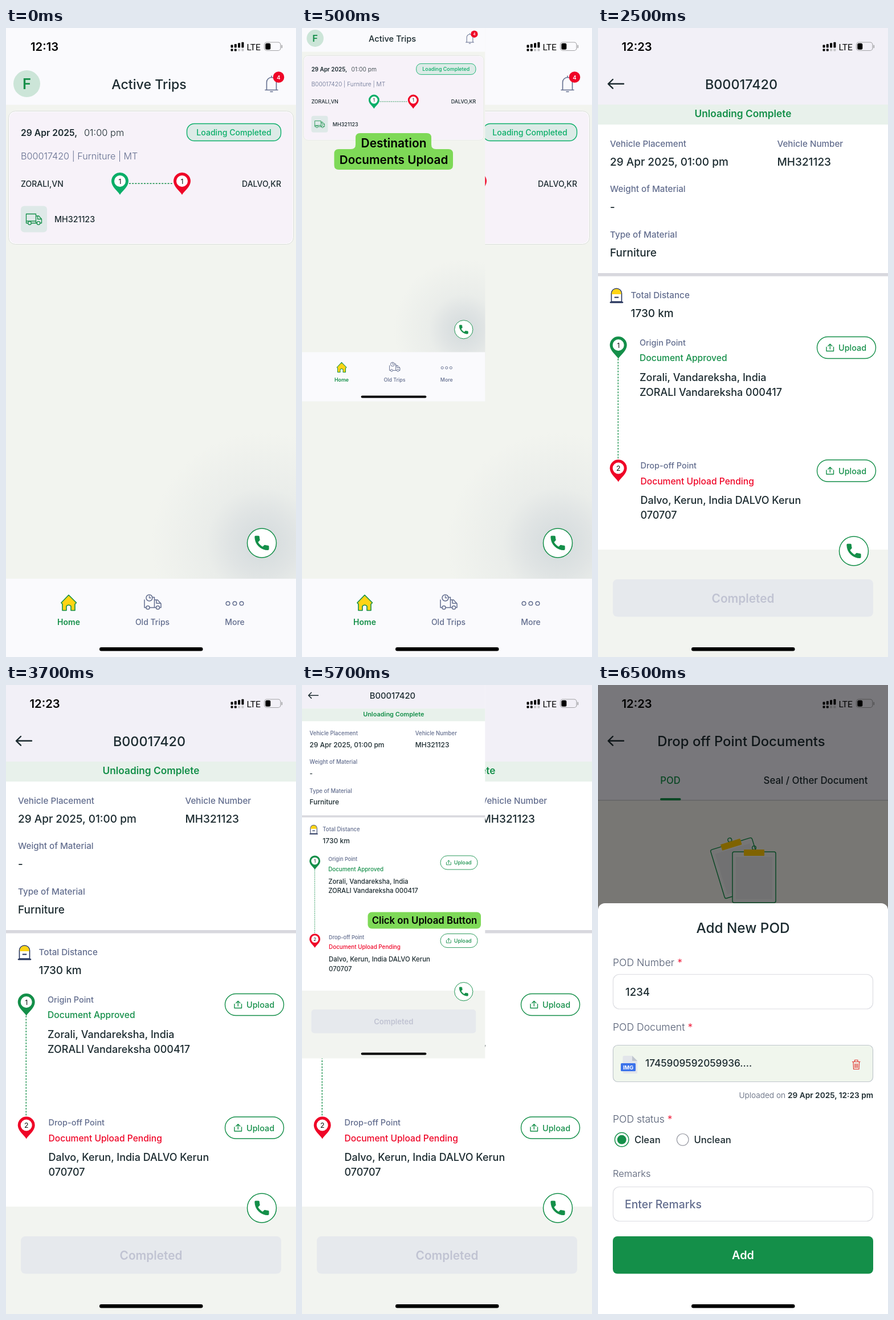
Write an HTML page that moves like this. It is 509 px wide and 1101 px high and loops after 8 s.

```html
<!DOCTYPE html>
<html lang="en">
<head>
<meta charset="utf-8">
<style>
  html, body { margin: 0; width: 100%; height: 100%; overflow: hidden; background: #f2f4ef; }
  svg { display: block; width: 100%; height: 100%; font-family: Inter, sans-serif; }
</style>
</head>
<body>
<svg id="stage" viewBox="0 0 509 1101" preserveAspectRatio="none"></svg>
<script>
const GREEN = '#148f49', MINT = '#0aae68', RED = '#ef0527', INK = '#1c2b30', SLATE = '#626d8e';
const LABEL = '#505a70', HEAD = '#f2f0f7', PALE = '#fafafd', LIME = '#7ed957';

const text = (x, y, size, str, fill = INK, weight = 500, anchor = 'start') =>
  `<text x="${x}" y="${y}" font-size="${size}" fill="${fill}" font-weight="${weight}" text-anchor="${anchor}">${str}</text>`;
const mid = (x, y, size, str, fill, weight) => text(x, y, size, str, fill, weight, 'middle');
const rect = (x, y, w, h, fill, r = 0, stroke = 'none', sw = 1.4) =>
  `<rect x="${x}" y="${y}" width="${w}" height="${h}" rx="${r}" fill="${fill}" stroke="${stroke}" stroke-width="${sw}"/>`;
const circle = (x, y, r, fill, stroke = 'none', sw = 1.4) =>
  `<circle cx="${x}" cy="${y}" r="${r}" fill="${fill}" stroke="${stroke}" stroke-width="${sw}"/>`;
const path = (d, stroke, sw = 1.5, fill = 'none', extra = '') =>
  `<path d="${d}" fill="${fill}" stroke="${stroke}" stroke-width="${sw}" stroke-linecap="round" stroke-linejoin="round" ${extra}/>`;
const dotted = d => `<path d="${d}" stroke="${GREEN}" stroke-width="1.4" stroke-dasharray="3 2.2"/>`;

const pin = (x, y, fill, n) =>
  path(`M${x} ${y + 24}C${x - 4} ${y + 17} ${x - 15} ${y + 10} ${x - 15} ${y}a15 15 0 0 1 30 0C${x + 15} ${y + 10} ${x + 4} ${y + 17} ${x} ${y + 24}z`, 'none', 0, fill)
  + circle(x, y, 10, '#fff') + mid(x, y + 4.5, 12.3, n, '#111', 400);

const phone = y => circle(449, y, 25.5, '#fff', GREEN, 1.5) +
  path('M6.6 10.8c1.4 2.8 3.8 5.1 6.6 6.6l2.2-2.2c.3-.3.7-.4 1-.2 1.1.4 2.3.6 3.6.6.6 0 1 .4 1 1V20c0 .6-.4 1-1 1C10.6 21 3 13.4 3 4c0-.6.4-1 1-1h3.5c.6 0 1 .4 1 1 0 1.3.2 2.5.6 3.6.1.3 0 .7-.3 1z',
    GREEN, .8, GREEN, `transform="translate(432.9 ${y - 16.2}) scale(1.34)"`);

const homeBar = rect(164, 1084, 181.5, 6.5, '#000', 3.25);

const status = (clock, x) => {
  let bars = '';
  for (let i = 0; i < 4; i++) {
    bars += rect(394.5 + i * 6.3, 29.5 - i * 1.6, 4, 5 + i * 1.6, '#000', 1)
      + rect(394.5 + i * 6.3, 36.5, 4, 4, i < 2 ? '#000' : '#c5c5c8', 1);
  }
  return text(x, 39.5, 20.3, clock, '#000', 600) + bars
    + '<text x="422.5" y="38.5" font-size="15.5" font-family="Roboto, sans-serif">LTE</text>'
    + rect(453.5, 25, 28.5, 14.5, 'none', 4.5, '#a3a3a6', 1.2) + rect(455.3, 26.8, 9, 11, '#000', 2.5)
    + path('M484.3 30.5v4', '#a3a3a6', 1.6);
};

const backArrow = path('M18 97.8H45M26 90l-8 7.8 8 7.8', INK, 2.4);

const bell = path('M455 108.5h22M457.5 108V95a8.5 8.5 0 0 1 17 0v13M466 86v-2M464 111.5h4', SLATE, 1.6)
  + circle(478.5, 86, 9.8, RED) + mid(478.5, 89.5, 9.5, '4', '#fff', 600);

const truck = path('M38 341.5H35.5V325.5H52.5V341.5H45M52.5 329H57.5L62.5 334.5V341.5H60M52.5 341.5H54M55.5 329V334.5H62.5M35.5 338H52.5', GREEN, 1.3)
  + circle(41.5, 341.5, 2.8, 'none', GREEN, 1.3) + circle(57, 341.5, 2.8, 'none', GREEN, 1.3);

const tabs = path('M97 1006L110 992.5 123.5 1006 121 1008.5V1019.5H114V1012q-4-4-8 0V1019.5H99V1008.5z', GREEN, 1.6, '#ffd414')
  + mid(110, 1045, 14, 'Home', GREEN, 600)
  + path('M246 1014.5h-3V1001M257 996.5h3.5V1014.5H252M260.5 1001H266L272 1007.5V1014.5H269.5M260.5 1014.5H263M264 1001.5V1007H271.5', SLATE)
  + circle(251.5, 997.5, 5.5, PALE, SLATE, 1.5) + path('M251.5 994v3.5h2.8', SLATE, 1.3)
  + circle(249, 1014.5, 3, PALE, SLATE, 1.5) + circle(266.5, 1014.5, 3, PALE, SLATE, 1.5)
  + mid(257, 1045, 14, 'Old Trips', SLATE)
  + [389.5, 401.5, 413.5].map(x => circle(x, 1007.3, 3.3, 'none', SLATE, 1.5)).join('')
  + mid(401.5, 1045, 14, 'More', SLATE);

const trips = rect(0, 0, 509, 1101, '#f2f4ef') + rect(0, 0, 509, 134.5, PALE)
  + circle(449, 902, 195, 'url(#glow)') + rect(0, 964, 509, 137, PALE)
  + status('12:13', 43) + circle(36.5, 97.5, 23.5, '#cce5d8') + mid(36.5, 106.5, 25.5, 'F', GREEN, 600)
  + mid(251, 107, 23.2, 'Active Trips') + bell
  + rect(4.5, 145.5, 500, 233, '#fff', 12, '#d9dbd9', 1) + rect(6, 147, 497, 230, '#f7f2f9', 11)
  + text(26, 188.5, 15.7, '29 Apr 2025,', INK, 600) + text(137, 188.5, 16.4, '01:00 pm', INK, 300)
  + rect(317.5, 167.5, 165, 30, '#dcebe7', 13, MINT) + mid(400, 188, 14.1, 'Loading Completed', MINT)
  + text(26, 230, 16.2, 'B00017420 | Furniture | MT', SLATE, 300)
  + text(26, 277.5, 14, 'ZORALI,VN') + text(483, 277.5, 14, 'DALVO,KR', INK, 500, 'end')
  + dotted('M216 272.3H294') + pin(200, 268, MINT, 1) + pin(309, 268, RED, 1)
  + rect(26, 311.5, 46, 46, '#dee9e8', 6) + truck + text(85, 340, 14.3, 'MH321123')
  + phone(901.5) + tabs + homeBar;

const upload = y => rect(384.5, y, 103, 38, '#fff', 19, GREEN)
  + path(`M401 ${y + 18}v7h12.5v-7M407.3 ${y + 21.5}V${y + 13}M403.8 ${y + 16.2}l3.5-3.4 3.5 3.4`, GREEN, 1.4)
  + text(422, y + 24.5, 14.4, 'Upload', GREEN);

const field = (y, label, value, x = 21) => text(x, y, 15.2, label, SLATE) + text(x, y + 33, 19, value);

const stop = (x, y, fill, n, title, state, lines) => pin(35.7, y, fill, n)
  + text(x, y + .5, 14.5, title, SLATE) + text(x, y + 28, 15.6, state, fill)
  + text(x, y + 62.5, 18, lines[0]) + text(x, y + 88.5, 18, lines[1]) + upload(y - 14.5);

const milestone = path('M23.5 479V464.5a9 8.5 0 0 1 18 0V479z', '#26345c', 1.6, '#fff')
  + path('M24.3 466v-1.5a8.2 7.8 0 0 1 16.4 0V466z', 'none', 0, '#ffd414')
  + path('M29.5 471.5h6', '#26345c', 1.8) + path('M22 480.3h21', '#26345c', 2.4);

const detail = rect(0, 0, 509, 1101, '#fff') + rect(0, 0, 509, 134, HEAD) + rect(0, 134, 509, 35, '#e8f1eb')
  + rect(0, 429, 509, 5.5, '#d8d8de') + rect(0, 913, 509, 188, '#f2f4f0')
  + status('12:23', 41.5) + backArrow + mid(251.5, 107, 23.4, 'B00017420')
  + mid(254.5, 156, 17.3, 'Unloading Complete', GREEN, 600)
  + field(207.5, 'Vehicle Placement', '29 Apr 2025, 01:00 pm') + field(207.5, 'Vehicle Number', 'MH321123', 314.5)
  + field(287, 'Weight of Material', '-') + field(366.5, 'Type of Material', 'Furniture')
  + milestone + field(472.5, 'Total Distance', '1730 km', 57.5)
  + dotted('M35.3 579V756')
  + stop(73, 555, GREEN, 1, 'Origin Point', 'Document Approved', ['Zorali, Vandareksha, India', 'ZORALI Vandareksha 000417'])
  + stop(74.5, 770.5, RED, 2, 'Drop-off Point', 'Document Upload Pending', ['Dalvo, Kerun, India DALVO Kerun', '070707'])
  + rect(26, 965, 457, 65.5, '#e6e9ed', 8) + mid(254.5, 1005.5, 20.8, 'Completed', '#c0c3d2', 600)
  + phone(915.5) + homeBar;

const board = rect(0, 0, 76, 89, '#eeeeee', 3, GREEN, 1.5) + rect(6, 9, 64, 74, '#e4e4e5')
  + circle(38, -7, 3.4, 'none', GREEN, 1.4) + rect(20, -4, 36, 11, '#ffc800', 1);

const required = (y, label) => text(26, y, 17.6, `${label} <tspan fill="${RED}">*</tspan>`, LABEL, 300);

const form = rect(0, 0, 509, 1101, '#f2f0ea') + rect(0, 0, 509, 202, HEAD) + rect(0, 201, 509, 1.3, '#c4c4c8')
  + status('12:23', 41.5) + backArrow + mid(251.5, 107, 23.9, 'Drop off Point Documents')
  + mid(127, 173, 16.6, 'POD', GREEN) + mid(382, 173, 16.9, 'Seal / Other Document') + rect(109, 198, 36.5, 4, GREEN, 2)
  + `<g transform="translate(197 289) rotate(-17)">${board}</g><g transform="translate(236 292)">${board}</g>`
  + '<rect width="509" height="1101" opacity=".5"/>'
  + rect(0, 382, 509, 740, '#fff', 12)
  + mid(254.5, 434, 24.3, 'Add New POD')
  + required(491.5, 'POD Number') + rect(26.5, 506.5, 456, 60.5, '#fff', 11, '#dcdde2', 1.2) + text(48, 543.5, 18.6, '1234')
  + required(605, 'POD Document') + rect(26.5, 630.5, 456, 64, '#f0f6ed', 8, '#bfc6cc', 1.2)
  + path('M46 649H60L69 658V680H46a2.5 2.5 0 0 1-2.5-2.5V651.5A2.5 2.5 0 0 1 46 649z', 'none', 0, '#e2e5ea')
  + path('M60 649L69 658H60z', 'none', 0, '#bfc5ce') + rect(40, 662, 26, 14, '#3b72ea', 1.5)
  + mid(53, 672.6, 9.3, 'IMG', '#fff', 700)
  + text(83, 668, 17.2, '1745909592059936....')
  + path('M446.5 659.5h13.5M450.5 659v-2.5h5.5v2.5M448 660l.6 12.5h9.4l.6-12.5M451 663v7M453.3 663v7M455.6 663v7', '#e2352f', 1.2)
  + text(483, 723, 13.7, `Uploaded on <tspan font-weight="600" fill="${INK}">29 Apr 2025, 12:23 pm</tspan>`, LABEL, 300, 'end')
  + required(765.5, 'POD status')
  + circle(41.7, 795.8, 12.2, '#fff', GREEN, 1.5) + circle(41.7, 795.8, 8, GREEN) + text(64, 802, 16.6, 'Clean')
  + circle(148.7, 795.8, 10.3, '#fff', '#9a9ca5', 1.2) + text(168.5, 802, 16.6, 'Unclean')
  + text(26, 861, 16.5, 'Remarks', LABEL, 300) + rect(26.5, 878.5, 456, 60, '#fff', 11, '#dcdde2', 1.2)
  + text(47, 915.5, 19.4, 'Enter Remarks', SLATE)
  + rect(26, 965, 457, 65.5, GREEN, 8) + mid(254.5, 1005, 19.8, 'Add', '#fff', 600) + homeBar;

// Shrunken copy of a page, laid over the top left corner.
const inset = page => `<g clip-path="url(#corner)"><g transform="matrix(.632 0 0 .634 0 -43.8)">${page}</g></g>`;
const uploadTag = path('M102 184H219q8 0 8 8V204q0 8 8 8H257q8 0 8 8V240q0 8-8 8H64.5q-8 0-8-8V220q0-8 8-8H86q8 0 8-8V192q0-8 8-8z', 'none', 0, LIME)
  + mid(161, 209, 20.9, 'Destination', '#000', 600) + mid(161, 238, 20.7, 'Documents Upload', '#000', 600);
const clickTag = rect(115.5, 397.5, 198.5, 29, LIME, 7) + mid(215, 418, 16.8, 'Click on Upload Button', '#000', 600);

const defs = `<defs>
  <clipPath id="corner"><rect width="321.5" height="653.5"/></clipPath>
  <radialGradient id="glow"><stop stop-color="#d3dadc"/><stop offset=".3" stop-color="#e0e4e4"/>
    <stop offset=".5" stop-color="#eaedea"/><stop offset="1" stop-color="#f2f4ef"/></radialGradient></defs>`;

const scenes = [
  [0, trips],
  [500, trips + inset(trips) + uploadTag],
  [2500, detail],
  [4500, detail + inset(detail) + clickTag],
  [6500, form],
];
const stage = document.getElementById('stage');
let shown;

function draw() {
  const time = performance.now() % 8000;
  const scene = scenes.findLast(([start]) => time >= start);
  if (scene !== shown) {
    shown = scene;
    stage.innerHTML = defs + scene[1];
  }
  requestAnimationFrame(draw);
}
draw();
</script>
</body>
</html>
```
